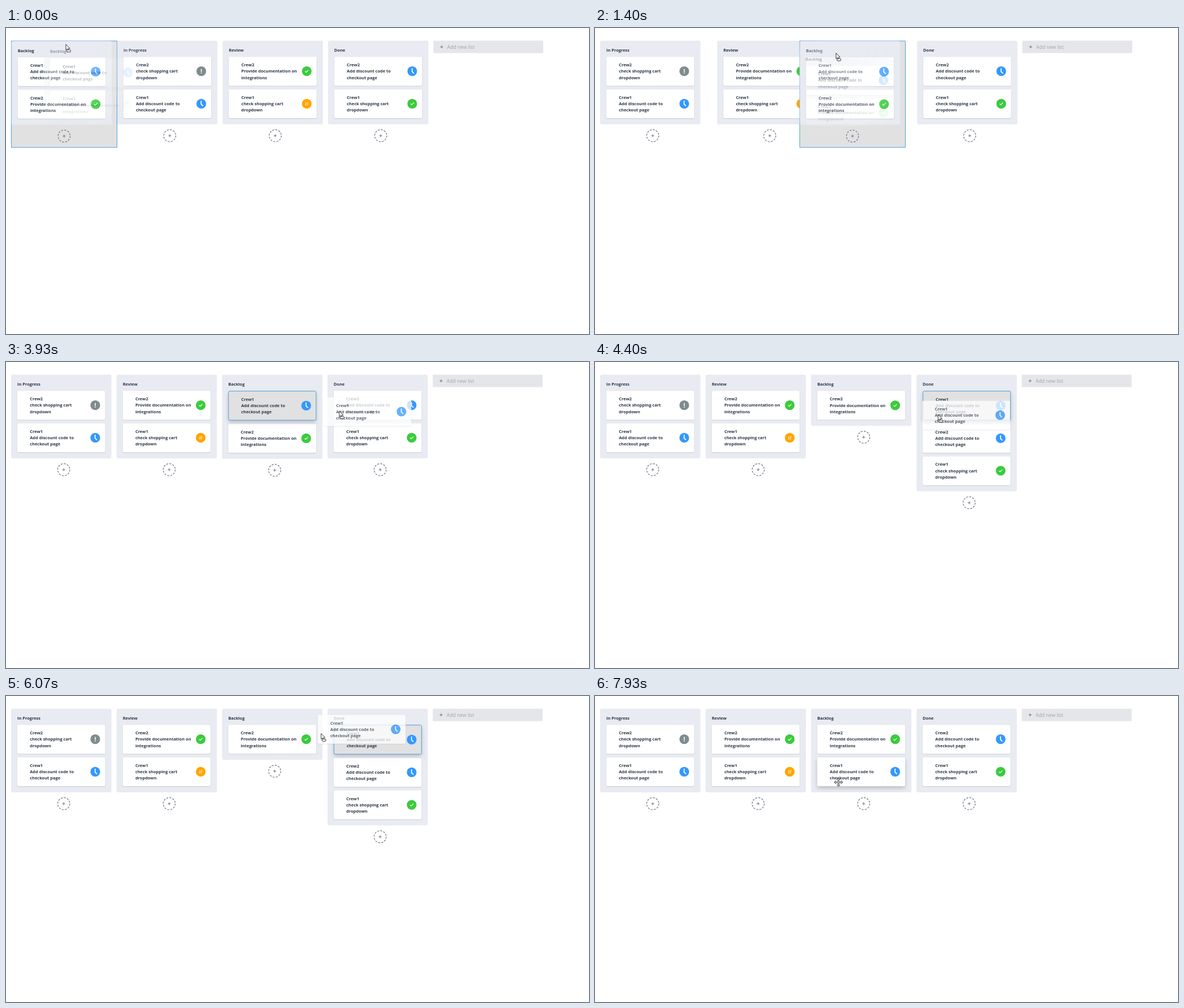
An HTML page with a canvas for the animation above (8000 ms loop, 1032 px wide and 543 px high).

```html
<!DOCTYPE html>
<html lang="en">
<head>
<meta charset="utf-8">
<title>Board</title>
<style>
html, body { margin: 0; width: 100%; height: 100%; overflow: hidden; background: #fff; }
canvas { display: block; }
</style>
</head>
<body>
<canvas id="stage" width="1032" height="543"></canvas>
<script>
const W = 1032, H = 543, LOOP = 8000, STEP = 200 / 3, SWAP = 340;
const LEFT = 9, TOP = 22.5, PITCH = 186.7, COL_W = 177.6;
const CARD_W = 155.5, CARD_H = 51.2, ROW = 57.7;
const INK = '#2d3748', LINE = '#6b7280', EDGE = '#4fa0dc', LIFTED = '#e1e1e1';
const FAMILY = '"Open Sans", "Noto Sans", sans-serif';
const BOLD = 'bold 7.45px ' + FAMILY;

const view = document.getElementById('stage').getContext('2d');
const layer = Object.assign(document.createElement('canvas'), { width: W, height: H }).getContext('2d');

const TITLES = { B: 'Backlog', P: 'In Progress', R: 'Review', D: 'Done' };
const CODE = ['Add discount code to', 'checkout page'];
const DOCS = ['Provide documentation on', 'integrations'];
const CART = ['check shopping cart', 'dropdown'];
const CARDS = {
  a: ['Crew1', CODE, 'clock'], b: ['Crew2', DOCS, 'check'],
  c: ['Crew2', CART, 'alert'], d: ['Crew1', CODE, 'clock'],
  e: ['Crew2', DOCS, 'check'], f: ['Crew1', CART, 'sort'],
  g: ['Crew2', CODE, 'clock'], h: ['Crew1', CART, 'check']
};
const COLORS = { clock: '#3498ff', check: '#3bcb3d', alert: '#7f8c8d', sort: '#ffa502' };

// Each board lists its columns as a title key followed by card keys.
const BOARDS = [
  [0, 'Bab Pcd Ref Dgh'],
  [330, 'Pcd Bab Ref Dgh'],
  [1130, 'Pcd Ref Bab Dgh'],
  [4070, 'Pcd Ref Bb Dagh'],
  [6150, 'Pcd Ref Bab Dgh'],
  [6495, 'Pcd Ref Bba Dgh']
].map(([time, text]) => ({ time, cols: text.split(' ') }));

// Pointer moves: begin, end, x, y; it rests in between.
const MOVES = [
  [0, 130, 112, 30], [200, 670, 330, 50], [1000, 1066, 349, 52], [1066, 1470, 443, 43],
  [1930, 2330, 464, 81], [2400, 2666, 413, 71], [3000, 3200, 428, 78], [3330, 3600, 562, 86],
  [3800, 3933, 590, 87], [3933, 4330, 606, 92], [4330, 4666, 612, 98], [4666, 4800, 612, 86],
  [4933, 5000, 615, 85], [5333, 5600, 589, 81], [5866, 6130, 548, 62], [6130, 6330, 480, 80],
  [6330, 6600, 431, 138], [6600, 6730, 430, 143], [7066, 7200, 431, 147], [7666, 7933, 431, 153]
];

const within = (t, a, b) => t >= a - 4 && t < b - 4;
const clamp = p => Math.min(1, Math.max(0, p));
const lerp = (a, b, p) => a + (b - a) * p;
const smooth = p => { p = clamp(p); return p * p * (3 - 2 * p); };

function pointerAt(t) {
  let x = 106, y = 29;
  for (const [begin, end, toX, toY] of MOVES) {
    const p = clamp((t - begin) / (end - begin));
    x = lerp(x, toX, p);
    y = lerp(y, toY, p);
  }
  return [x, y];
}

// Where the pointer holds the dragged item.
function gripAt(t) {
  if (t > 5500) return [6, 33];
  if (t > 2000) return [28, 24.5];
  const p = clamp(t / 1066);
  return [lerp(39, 65, p), lerp(4, 6, p)];
}

function box(g, x, y, w, h, r, fill, stroke) {
  g.beginPath();
  g.roundRect(x, y, w, h, r);
  g.fillStyle = fill;
  g.fill();
  if (!stroke) return;
  g.shadowColor = 'transparent';
  g.strokeStyle = stroke;
  g.lineWidth = 1;
  g.stroke();
}

function line(g, color, width, ...lines) {
  g.beginPath();
  for (const pts of lines)
    for (let i = 0; i < pts.length; i += 2) g[i ? 'lineTo' : 'moveTo'](pts[i], pts[i + 1]);
  g.strokeStyle = color;
  g.lineWidth = width;
  g.stroke();
}

function text(g, str, x, y, font = BOLD, color = INK) {
  g.font = font;
  g.fillStyle = color;
  g.fillText(str, x, y);
}

function plus(g, x, y, r, color) {
  line(g, color, 1, [x - r, y, x + r, y], [x, y - r, x, y + r]);
}

function icon(g, kind, x, y) {
  g.save();
  g.translate(x, y);
  g.beginPath();
  g.arc(0, 0, 8.6, 0, 7);
  g.fillStyle = COLORS[kind];
  g.fill();
  if (kind === 'clock') line(g, '#fff', 1.7, [-0.3, -5.3, -0.3, 0.7, 3.2, 4]);
  if (kind === 'check') line(g, '#fff', 1.1, [-3, 0, -1, 2, 3, -2]);
  if (kind === 'alert') line(g, '#fff', 1.6, [0, -4, 0, 1.2], [0, 2.4, 0, 4]);
  if (kind === 'sort') line(g, '#fff', 0.9,
    [-1.4, -3, -1.4, 2.8], [-2.9, 1.2, -1.4, 2.8], [1.4, 3, 1.4, -2.8, 2.9, -1.2]);
  g.restore();
}

function card(g, key, x, y, { lifted, hover, marked } = {}) {
  const [who, lines, kind] = CARDS[key];
  g.save();
  g.shadowColor = hover ? 'rgba(0,0,0,.2)' : 'rgba(0,0,0,.14)';
  g.shadowBlur = hover ? 7 : 2;
  g.shadowOffsetY = hover ? 3.5 : 0.8;
  if (lifted) box(g, x + 0.5, y + 0.5, CARD_W - 0.5, CARD_H + 0.3, 2, LIFTED, EDGE);
  else box(g, x, y, CARD_W, CARD_H, 2, '#fff');
  g.restore();
  if (marked) box(g, 614, 71, 86, 23, 0, '#f2f3f5');
  const d = lifted ? 0.6 : 0;
  [who, ...lines].forEach((s, i) => text(g, s, x + 22.2 + d, y + 17 + d + i * 11.2));
  icon(g, kind, x + 138, y + 25.5 + d);
}

function column(g, col, x, y, opt = {}) {
  const { rows = [], lifted, hover, marked, bare } = opt;
  const keys = [...col.slice(1)];
  const held = keys.indexOf(lifted);
  const grow = held < 0 ? 0 : 1;
  const height = 33 + ROW * keys.length + grow;
  box(g, x, y, COL_W, height, 3, '#e8ebf1');
  text(g, TITLES[col[0]], x + 11, y + 19.3);
  const order = keys.map((key, i) => [key, i]).sort((a, b) => (a[0] === lifted) - (b[0] === lifted));
  for (const [key, i] of order) {
    const drop = held >= 0 && i > held ? 1 : 0;
    card(g, key, x + 11, y + 28.7 + (rows[i] ?? i) * ROW + drop,
      { lifted: key === lifted, hover: key === hover, marked: marked && key === hover });
  }
  if (bare) return;
  const cx = x + 93.2, cy = y + height + 20.2;
  g.setLineDash([3.4, 2.2]);
  g.beginPath();
  g.arc(cx, cy, 10.7, 0, 7);
  g.strokeStyle = LINE;
  g.lineWidth = 1.2;
  g.stroke();
  g.setLineDash([]);
  plus(g, cx, cy, 2.6, LINE);
}

function pointer(kind, x, y) {
  const g = view;
  g.save();
  g.translate(x, y);
  if (kind === 'move') {
    const arms = [[-6, 0, 6, 0], [0, -6, 0, 6]];
    const tips = [0, 1, 2, 3].map(n => {
      const c = [1, 0, -1, 0][n], s = [0, 1, 0, -1][n];
      return [[4, -2], [6, 0], [4, 2]].flatMap(([a, b]) => [a * c - b * s, a * s + b * c]);
    });
    line(g, '#333', 2.6, ...arms, ...tips);
    line(g, '#fff', 0.9, ...arms, ...tips);
  } else if (kind === 'text') {
    line(g, '#333', 1, [-2, -5, 2, -5], [0, -5, 0, 5], [-2, 5, 2, 5]);
  } else {
    g.beginPath();
    [[0, 0], [0, 10], [2.3, 8], [4, 11.5], [5.6, 10.8], [4, 7.4], [7, 7.2]].forEach(p => g.lineTo(...p));
    g.closePath();
    g.fillStyle = '#fff';
    g.fill();
    g.strokeStyle = '#222';
    g.lineWidth = 0.9;
    g.stroke();
    box(g, 1.8, 9.8, 6.4, 3.8, 0.5, '#fff', '#333');
  }
  g.restore();
}

function ghost(t, px, py, isColumn) {
  const [dx, dy] = gripAt(t);
  layer.clearRect(0, 0, W, H);
  if (isColumn) {
    column(layer, 'Bab', px - dx, py - dy, { bare: true });
    const fade = layer.createRadialGradient(px, py, 0, px, py, 165);
    fade.addColorStop(0, 'rgba(0,0,0,.5)');
    fade.addColorStop(1, 'rgba(0,0,0,0)');
    layer.globalCompositeOperation = 'destination-in';
    layer.fillStyle = fade;
    layer.fillRect(0, 0, W, H);
    layer.globalCompositeOperation = 'source-over';
  } else {
    card(layer, 'a', px - dx, py - dy);
  }
  view.globalAlpha = isColumn ? 1 : 0.75;
  view.drawImage(layer.canvas, 0, 0);
  view.globalAlpha = 1;
}

function draw(t) {
  const g = view;
  g.fillStyle = '#fff';
  g.fillRect(0, 0, W, H);

  const at = BOARDS.findLastIndex(b => b.time <= t);
  const now = BOARDS[at], before = BOARDS[Math.max(0, at - 1)];
  const p = smooth((t - now.time) / SWAP);
  const colDrag = within(t, 0, 1530);
  const cardDrag = within(t, 3070, 5000) || within(t, 5930, 7130);
  const heldCol = now.cols.findIndex(c => c[0] === 'B');
  const hover = t < 2130 ? '' : within(t, 5000, 7800) ? now.cols[3][1] : 'a';

  const order = [0, 1, 2, 3].sort((a, b) => (a === heldCol) - (b === heldCol));
  for (const i of order) {
    const col = now.cols[i];
    const from = before.cols.findIndex(c => c[0] === col[0]);
    const old = before.cols[from].slice(1);
    const rows = [...col.slice(1)].map((key, n) => {
      const m = old.indexOf(key);
      return lerp(m < 0 ? n : m, n, p);
    });
    const lift = colDrag && i === heldCol;
    let x = LEFT + lerp(from, i, p) * PITCH + (colDrag && i > heldCol ? 1 : 0);
    let y = TOP;
    if (lift) {
      box(g, x + 0.5, y + 0.5, PITCH + 0.3, 189, 0, LIFTED, EDGE);
      x += 0.7;
      y += 0.7;
    }
    column(g, col, x, y, {
      rows, hover, lifted: cardDrag ? 'a' : '', marked: i === 3 && within(t, 5000, 5930)
    });
  }

  const addX = LEFT + 4 * PITCH - 0.4 + (colDrag ? 1 : 0);
  box(g, addX, TOP, 194.5, 22, 1, '#e5e6ea');
  plus(g, addX + 14.8, 33.5, 2.7, LINE);
  text(g, 'Add new list', addX + 24.6, 36.7, '8.65px ' + FAMILY, '#9ca3af');

  const [px, py] = pointerAt(t);
  if (colDrag || cardDrag) ghost(t, px, py, colDrag);
  pointer(colDrag || cardDrag ? 'drag' : within(t, 5000, 5400) ? 'text' : 'move', px, py);
}

const start = performance.now();
function tick() {
  const t = (performance.now() - start) % LOOP;
  draw(Math.floor((t + 3.4) / STEP) * STEP % LOOP); // 15 steps per second
  requestAnimationFrame(tick);
}
tick();
</script>
</body>
</html>
```
